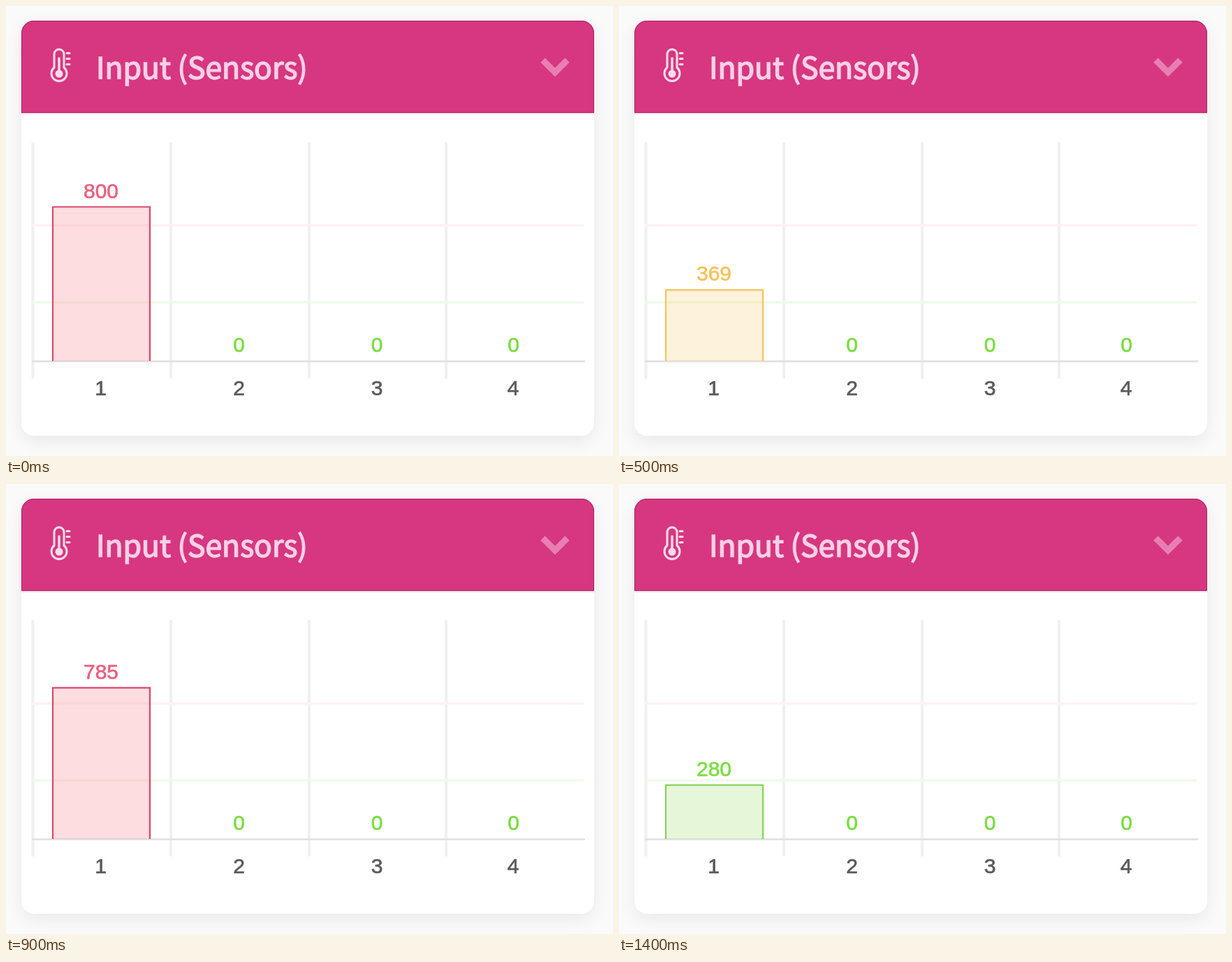
An HTML page for the animation above (1.5 s loop, 869 by 644 pixels).

```html
<!DOCTYPE html>
<html lang="en">
<head>
<meta charset="utf-8">
<title>Sensor chart</title>
<style>
html, body { margin: 0; width: 100%; height: 100%; overflow: hidden; background: #fafafa; }
svg { position: absolute; left: 0; top: 0; }
.card { position: absolute; left: 22px; top: 21px; width: 820px; height: 594px; border-radius: 18px;
  background: #fff; box-shadow: 0 8px 24px rgba(0, 0, 0, .07); }
.title { font: 42.7px "Noto Sans CJK JP", "Noto Sans CJK SC", "Noto Sans CJK", "Noto Sans", sans-serif;
  fill: #fbd0e6; stroke: #fbd0e6; stroke-width: 1.5; }
.chart text { font: 30px "Liberation Sans", Arial, sans-serif; text-anchor: middle; stroke-width: .7; }
.icon { fill: none; stroke: #fbdbea; stroke-width: 3; stroke-linecap: round; }
</style>
</head>
<body>
<div class="card"></div>
<svg width="869" height="644" viewBox="0 0 869 644">
  <path d="M22 153V39a18 18 0 0 1 18-18H824a18 18 0 0 1 18 18V153Z" fill="#d63780"/>
  <path d="M22.5 152.5V39A17.5 17.5 0 0 1 40 21.5H824A17.5 17.5 0 0 1 841.5 39V152.5Z" fill="none" stroke="#ad1c60"/>
  <path d="M22 154H842" stroke="#f6dae8" stroke-width="2"/>
  <g class="icon">
    <path d="M69 88V69a7 7 0 0 1 14 0V88a11 11 0 1 1-14 0Z"/>
    <path d="M76 75V97" stroke-width="3.500"/>
    <circle cx="76" cy="97" r="5.500" fill="#fbdbea" stroke="none"/>
    <path d="M87 67.500H91M87 75.500H91M87 83.500H91" stroke-width="3"/>
  </g>
  <text class="title" x="129" y="103.500">Input (Sensors)</text>
  <path d="M768.500 77.500L786 95L803.500 77.500" fill="none" stroke="#e87fb2" stroke-width="9"/>
  <g class="chart">
    <path d="M38.500 195V533M236 195V533M434 195V533M630 195V533" stroke="#f0f0f0" stroke-width="4"/>
    <path d="M37 314H827" stroke="#fff2f3" stroke-width="3.500"/>
    <path d="M37 424H827" stroke="#f0faea" stroke-width="3.500"/>
    <path d="M37 508.500H829" stroke="#dfdfdf" stroke-width="2.500"/>
    <path id="bar" stroke-width="2.200"/>
    <text id="value" x="136"></text>
    <g fill="#7ddb42" stroke="#7ddb42">
      <text x="333.500" y="495">0</text><text x="531" y="495">0</text><text x="726.500" y="495">0</text>
    </g>
    <g fill="#5a5a5a" stroke="#5a5a5a">
      <text x="135.500" y="556.500">1</text><text x="333.500" y="556.500">2</text><text x="531" y="556.500">3</text><text x="726" y="556.500">4</text>
    </g>
  </g>
</svg>
<script>
const STEP = 100, BASE = 508, SCALE = 0.2756;
const readings = [800, 800, 797, 772, 590, 369, 296, 280, 560, 785, 720, 534, 369, 295, 280];
const levels = [
  { above: 700, fill: 'rgba(251,84,108,.2)', stroke: '#d9476a', text: '#e8617f' },
  { above: 300, fill: 'rgba(245,190,72,.2)', stroke: '#f2c35c', text: '#f6c25c' },
  { above: -1, fill: 'rgba(130,210,65,.2)', stroke: '#86d25c', text: '#7ddb42' }
];
const bar = document.getElementById('bar');
const value = document.getElementById('value');
let shown = -1;

function show(reading) {
  const top = BASE - reading * SCALE;
  const level = levels.find(l => reading > l.above);
  bar.setAttribute('d', `M67 ${BASE}V${top}H206V${BASE}`);
  bar.setAttribute('fill', level.fill);
  bar.setAttribute('stroke', level.stroke);
  value.setAttribute('y', top - 13);
  value.setAttribute('fill', level.text);
  value.setAttribute('stroke', level.text);
  value.textContent = reading;
}

function tick() {
  const index = Math.floor(performance.now() / STEP) % readings.length;
  if (index !== shown) show(readings[shown = index]);
  requestAnimationFrame(tick);
}
tick();
</script>
</body>
</html>
```
